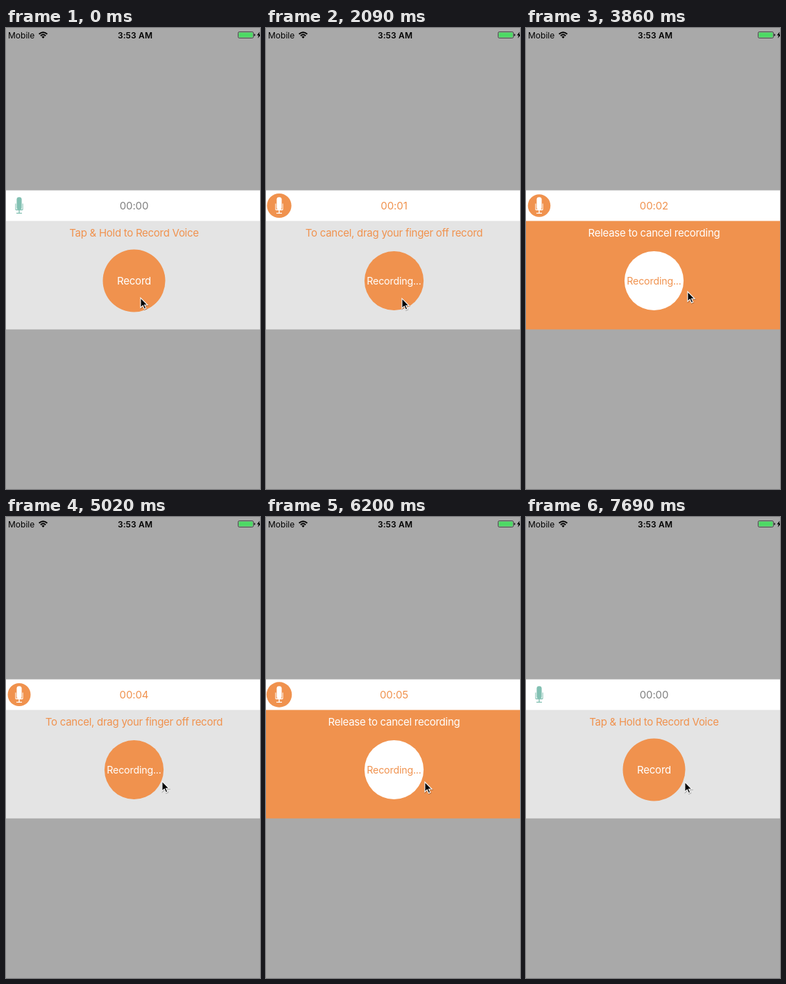
These frames come from a looping animation (366 px wide and 663 px high, 8000 ms). An HTML page:

```html
<!DOCTYPE html>
<html lang="en">
<head>
<meta charset="utf-8">
<title>Voice recorder</title>
<style>
  html, body { margin: 0; width: 100%; height: 100%; overflow: hidden; background: #a9a9a9; }
  svg { display: block; width: 366px; height: 663px; }
  text { font-family: Inter, "Open Sans", sans-serif; font-size: 15px; letter-spacing: -.1px; text-anchor: middle; }
  .status { font-size: 12px; letter-spacing: 0; }
  #time { letter-spacing: .14px; }
  #hint { letter-spacing: -.27px; }
  #label { letter-spacing: -.18px; }
</style>
</head>
<body>
<svg viewBox="0 0 366 663">
  <rect width="366" height="663" fill="#a9a9a9"/>

  <text class="status" x="3" y="14.5" style="text-anchor:start">Mobile</text>
  <g fill="none" stroke="#000" stroke-width="1.9">
    <path d="M47.6 8.8Q53.5 3.6 59.4 8.8"/>
    <path d="M49.9 11.2Q53.5 8 57.1 11.2"/>
  </g>
  <path d="M51.4 12.7Q53.5 11 55.6 12.7L53.5 15Z"/>
  <text id="time" class="status" x="186" y="14.5" font-weight="600">3:53 AM</text>
  <rect x="334.5" y="5.5" width="22" height="9" rx="1.8" fill="none" stroke="#333" stroke-width=".8"/>
  <rect x="335.5" y="6.5" width="20" height="7" rx=".8" fill="#4cd964"/>
  <path d="M357.6 8.3q1.5 0 1.5 1.7t-1.5 1.7z"/>
  <path d="M365.5 5.5L361.5 10.6H364L362.8 14.8L367.5 9.2H364.8Z"/>

  <rect y="233.5" width="366" height="46" fill="#fff"/>
  <rect id="panel" y="277.5" width="366" height="156"/>
  <circle id="pulse" cx="19" cy="255.5" fill="#f0924e"/>
  <g id="mic">
    <rect x="15.4" y="243.2" width="7.2" height="18.3" rx="3.4"/>
    <path d="M13.4 252.5h1v8.3h9.2v-8.3h1v8.2q0 1.6-1.6 1.6h-8q-1.6 0-1.6-1.6z"/>
    <path d="M18.3 262h1.4v3.8h3.3v1.2h-8v-1.2h3.3z"/>
  </g>
  <text id="clock" x="184.5" y="261"></text>
  <text id="hint" x="184.5" y="300"></text>
  <g id="button">
    <circle r="45"/>
    <text id="label" y="5.5"></text>
  </g>
  <g id="cursor">
    <path d="M1 1.5V15.5L4.2 12.5L6.4 17.5L9 16.4L6.9 11.5H11Z" fill="#000" opacity=".22" stroke="#000" stroke-width="1.6"/>
    <path d="M.5 .3V14.5L3.8 11.5L6 16.6L8.4 15.6L6.2 10.6H10.6Z" stroke="#fff" stroke-width="1.1"/>
  </g>
</svg>
<script>
const LOOP = 8000, STEP = 147.6, PRESS = 900, RELEASE = 7690, START = 965;
const ORANGE = '#f0924e', WHITE = '#fff', GREY = '#e4e4e4';
const EDGE = 227;

// time, x, y
const path = [
  [0, 194, 388], [900, 194, 388], [1200, 196, 388], [2100, 196, 389], [2700, 197, 391],
  [3150, 197, 391], [3420, 216, 386], [3550, 229, 381], [3850, 233, 379], [4700, 233, 379],
  [4980, 225, 380], [6040, 225, 380], [6200, 229, 381], [8000, 229, 381]
];
const $ = id => document.getElementById(id);
const fill = (id, color) => $(id).setAttribute('fill', color);

// The screen refreshes in fixed steps while the button is in use.
function snap(t) {
  return t < PRESS ? 0 : PRESS + STEP * Math.floor((t - PRESS + 14) / STEP);
}

function pointer(t) {
  const i = Math.max(1, path.findIndex(p => p[0] >= t));
  const [a, b] = [path[i - 1], path[i]];
  const k = (t - a[0]) / (b[0] - a[0]);
  return [1, 2].map(n => a[n] + (b[n] - a[n]) * k);
}

function draw(time) {
  const raw = time % LOOP, t = snap(raw);
  const held = raw >= PRESS && raw < RELEASE;
  const [x, y] = pointer(t);
  const out = held && x > EDGE;
  const run = Math.max(0, t - START);

  fill('panel', out ? ORANGE : GREY);
  fill('mic', held ? WHITE : '#82c0b2');
  $('pulse').setAttribute('r', held ? 18.25 - 2.15 * Math.cos(run / 700 * Math.PI) : 0);

  $('clock').textContent = '00:0' + (held ? Math.floor(run / 1000) : 0);
  fill('clock', held ? ORANGE : '#808080');
  $('hint').textContent = !held ? 'Tap & Hold to Record Voice'
    : out ? 'Release to cancel recording' : 'To cancel, drag your finger off record';
  fill('hint', out ? WHITE : ORANGE);

  $('button').setAttribute('transform', `translate(184.5 363.5) scale(${held ? .947 : 1})`);
  fill('button', out ? WHITE : ORANGE);
  $('label').textContent = held ? 'Recording...' : 'Record';
  fill('label', out ? ORANGE : WHITE);
  $('cursor').setAttribute('transform', `translate(${x - .6} ${y - .3})`);
}

const begin = performance.now();
function tick() {
  draw(performance.now() - begin);
  requestAnimationFrame(tick);
}
tick();
</script>
</body>
</html>
```
